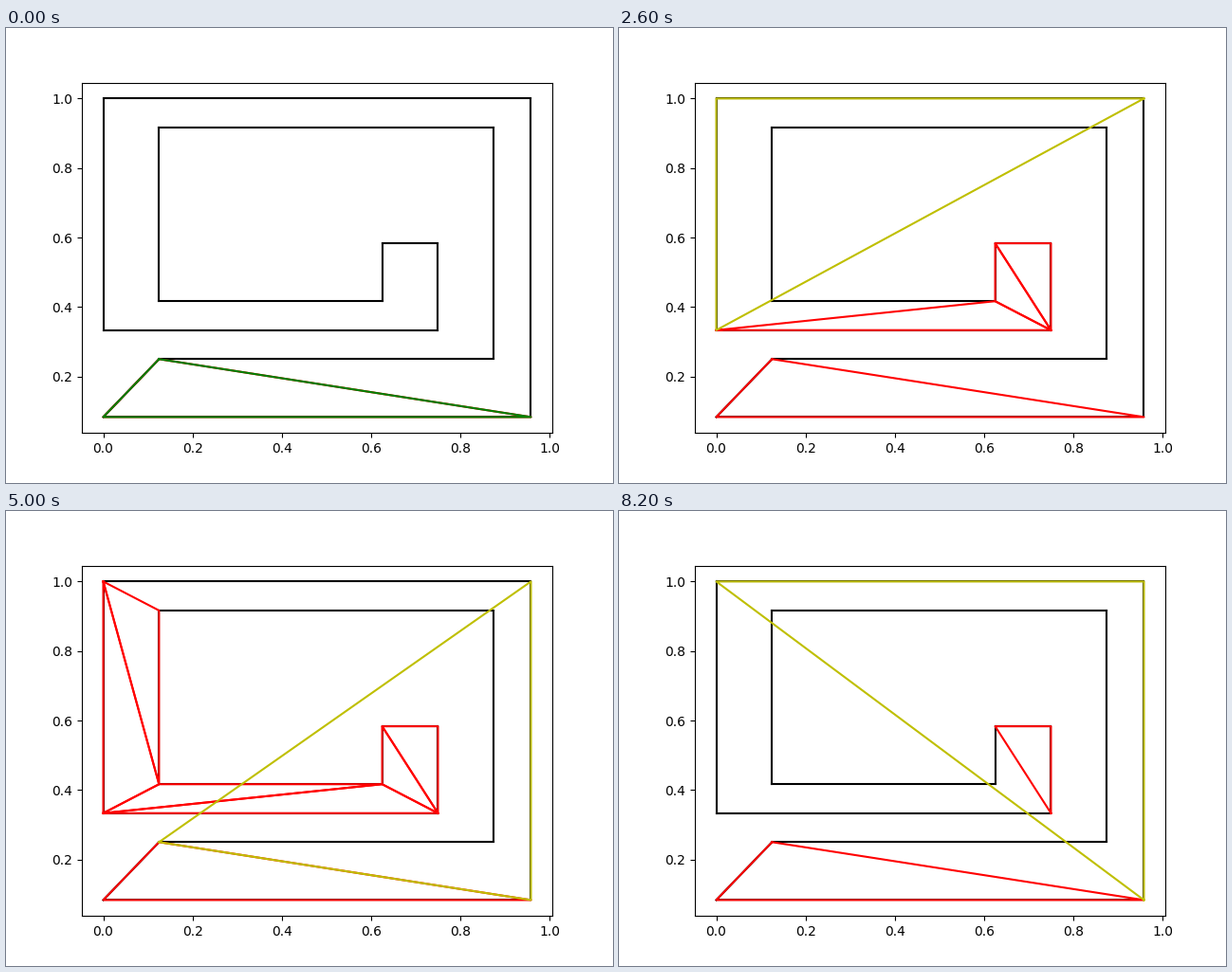
Animation, 640 px wide and 480 px high, one loop 8.4 s. Source, as a matplotlib script:

```python
import matplotlib.pyplot as plt
import numpy as np
from matplotlib.animation import FuncAnimation

# Spiral-shaped polygon, counter-clockwise, on a 24 x 12 lattice
POLY = np.array([
    (0, 1), (23, 1), (23, 12), (0, 12), (0, 4), (18, 4), (18, 7),
    (15, 7), (15, 5), (3, 5), (3, 11), (21, 11), (21, 3), (3, 3),
]) / (24, 12)


def cross(a, b, c):
    return (b[0] - a[0]) * (c[1] - a[1]) - (b[1] - a[1]) * (c[0] - a[0])


def is_ear(tri, rest):
    a, b, c = POLY[list(tri)]
    if cross(a, b, c) <= 0:
        return False
    return not any(
        min(cross(a, b, p), cross(b, c, p), cross(c, a, p)) > 0
        for p in POLY[[i for i in rest if i not in tri]]
    )


def triangulate():
    """Ear clipping; returns the triangles and every test made on the way."""
    rest = list(range(len(POLY)))
    ears, steps = [], []
    while len(rest) > 3:
        for k, v in enumerate(rest):
            tri = (rest[k - 1], v, rest[(k + 1) % len(rest)])
            if is_ear(tri, rest):
                ears.append(tri)
                steps.append((len(ears), tri, "g"))
                rest.remove(v)
                break
            steps.append((len(ears), tri, "y"))
    ears.append(tuple(rest))
    steps.append((len(ears), None, None))
    return ears, steps


def outline(tri):
    return POLY[list(tri) + [tri[0]]].T


ears, steps = triangulate()
# Steps play in the alphabetical order of their numbers: 1, 10, 11, ...
order = sorted(range(1, len(steps) + 1), key=str)

fig, ax = plt.subplots(figsize=(6.4, 4.8), dpi=100)
edges = [ax.plot(*zip(p, q), "k")[0]
         for p, q in zip(POLY, np.roll(POLY, -1, axis=0))]
clipped = [ax.plot(*outline(tri), "r")[0] for tri in ears]
trial, = ax.plot(*outline(ears[0]), "g")


def update(i):
    count, tri, color = steps[order[i] - 1]
    for edge in edges:
        edge.set_visible(tri is not None)
    for k, line in enumerate(clipped):
        line.set_visible(k < count)
    trial.set_visible(tri is not None)
    if tri is not None:
        trial.set_data(*outline(tri))
        trial.set_color(color)
    return [*edges, *clipped, trial]


anim = FuncAnimation(fig, update, frames=len(order), interval=200,
                     repeat=True, repeat_delay=0)
plt.show()
```
